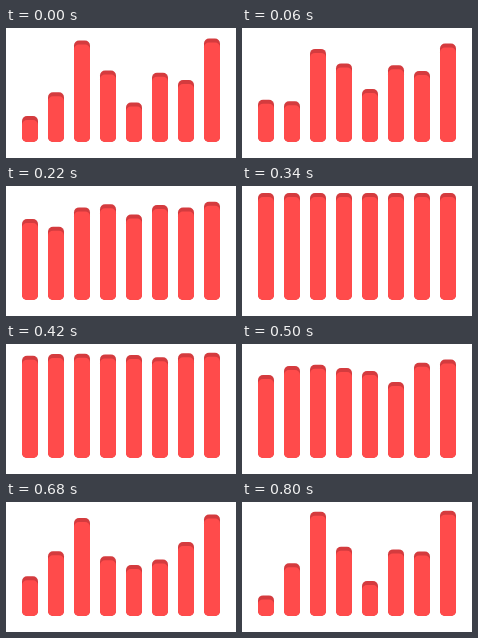
These frames come from a looping animation (230x130 px, 0.82 s). An HTML page with a canvas:

```html
<!DOCTYPE html>
<html lang="en">
<head>
<meta charset="utf-8">
<title>Equalizer bars</title>
<style>
  html, body { margin: 0; width: 100%; height: 100%; overflow: hidden; background: #fff; }
  canvas { display: block; }
</style>
</head>
<body>
<canvas width="230" height="130"></canvas>
<script>
const LOOP = 820, START = 400, STEP = 20;
const TOP = 7, BOTTOM = 114, LEFT = 16, SPACING = 26;
const WIDTH = 16, RADIUS = 5, CAP = 4;
const ctx = document.querySelector('canvas').getContext('2d');

// Each bar drops by `depth` and returns; `turn` is the share of a bounce spent dropping.
const bars = [
  { depth: 86.4, turn: 0.53 },
  { depth: 71.7, turn: 0.7 },
  { depth: 24.5, turn: 0.52, bounces: 2 },
  { depth: 47.5, turn: 0.41 },
  { depth: 72, turn: 0.53 },
  { depth: 61, turn: 0.29 },
  { depth: 45, turn: 0.56 },
  { depth: 15, turn: 0.52, bounces: 2 },
];

// Pacing: slower around the middle, then a rest at full height.
const pacing = [[0, 0], [280, 0.412], [400, 0.53], [560, 0.765], [760, 1], [LOOP, 1]];

function progress(t) {
  const i = pacing.findIndex(([end]) => t < end);
  const [t0, p0] = pacing[i - 1], [t1, p1] = pacing[i];
  return p0 + (p1 - p0) * (t - t0) / (t1 - t0);
}

function drop(p, { depth, turn, bounces = 1 }) {
  const u = p * bounces % 1;
  return depth * Math.min(u / turn, (1 - u) / (1 - turn));
}

function fillBar(x, top, color) {
  ctx.fillStyle = color;
  ctx.beginPath();
  ctx.roundRect(x, top, WIDTH, BOTTOM - top, RADIUS);
  ctx.fill();
}

function draw() {
  const now = Math.floor(performance.now() / STEP) * STEP;
  const p = progress((now + LOOP - START) % LOOP);
  ctx.clearRect(0, 0, 230, 130);
  bars.forEach((bar, i) => {
    const x = LEFT + SPACING * i, top = TOP + drop(p, bar);
    fillBar(x, top, '#d43b3e');
    fillBar(x, top + CAP, '#ff4b4b');
  });
  requestAnimationFrame(draw);
}
draw();
</script>
</body>
</html>
```
